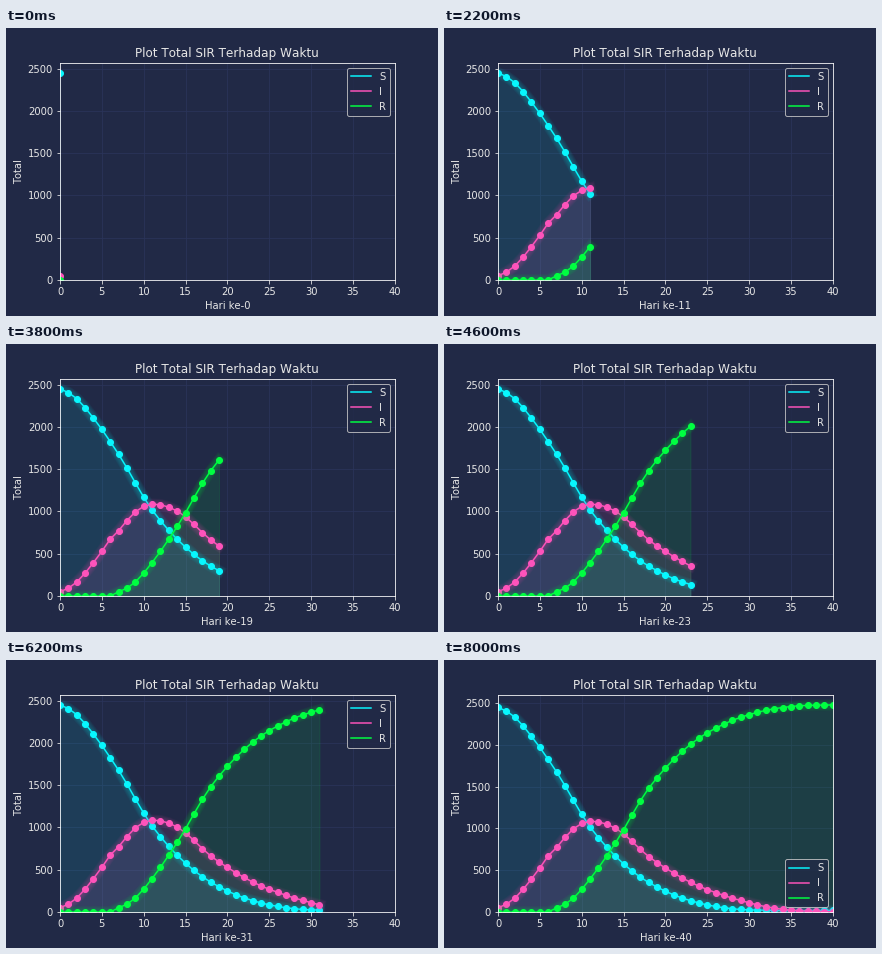
A matplotlib script for the animation above (8200 ms loop, 432 by 288 pixels).

```python
import matplotlib.pyplot as plt
import numpy as np
from matplotlib.animation import FuncAnimation

DAYS = 40
TOTAL = 2500
SICK_DAYS = 7
COLORS = {"S": "#08F7FE", "I": "#FE53BB", "R": "#00FF41"}

plt.style.use("dark_background")
plt.rcParams.update({
    "font.family": "DejaVu Sans",
    "text.kerning_factor": 6,
    "figure.subplot.bottom": 0.125,
    "figure.facecolor": "#212946",
    "axes.facecolor": "#212946",
    "savefig.facecolor": "#212946",
    "grid.color": "#2A3459",
    **{key: "0.9" for key in ("text.color", "axes.labelcolor",
                              "xtick.color", "ytick.color")},
})


def smooth_curve(t, xs, ys):
    """Cubic Hermite curve through the key points."""
    slopes = np.gradient(ys, xs, edge_order=2)
    i = np.clip(np.searchsorted(xs, t, side="right") - 1, 0, len(xs) - 2)
    h = xs[i + 1] - xs[i]
    u = (t - xs[i]) / h
    blend = u * u * (3 - 2 * u)
    return (ys[i] * (1 - blend) + ys[i + 1] * blend
            + h * u * (1 - u) * (slopes[i] * (1 - u) - slopes[i + 1] * u))


def simulate():
    # Everyone infected recovers after SICK_DAYS, so S alone fixes I and R.
    key_days = np.array([0, 2, 4, 7, 11, 13, 16, 20, 24, 28, 33, 40])
    key_s = np.array([2450, 2335, 2104, 1677, 1018, 776, 492, 249, 108, 39, 20, 20])
    s = smooth_curve(np.arange(DAYS + 1), key_days, key_s).round()
    r = np.zeros_like(s)
    r[SICK_DAYS:] = TOTAL - s[:-SICK_DAYS]
    return {"S": s, "I": TOTAL - s - r, "R": r}


series = simulate()
fig, ax = plt.subplots(figsize=(6, 4), dpi=72)


def glow_plot(x, y, color, label):
    ax.plot(x, y, color=color, lw=1.5, label=label)
    for n in range(1, 11):
        ax.plot(x, y, color=color, lw=1.5 + 1.05 * n, alpha=0.03)
    ax.plot(x, y, "o", color=color, ms=6)
    ax.fill_between(x, y, color=color, alpha=0.1)


def draw(day):
    ax.clear()
    x = np.arange(day + 1)
    for name, values in series.items():
        glow_plot(x, values[:day + 1], COLORS[name], name)
    peak = max(values[:day + 1].max() for values in series.values())
    ax.set(xlim=(0, DAYS), ylim=(0, peak * 1.05),
           title="Plot Total SIR Terhadap Waktu",
           xlabel=f"Hari ke-{day}", ylabel="Total")
    ax.set_yticks(range(0, TOTAL + 1, 500))
    ax.set_axisbelow(True)
    ax.grid(True)
    # The curves reach the upper corner on day 35.
    ax.legend(loc="lower right" if day >= 35 else "upper right")


anim = FuncAnimation(fig, draw, frames=DAYS + 1, init_func=lambda: None,
                     interval=200, repeat=True, repeat_delay=0)
plt.show()
```
